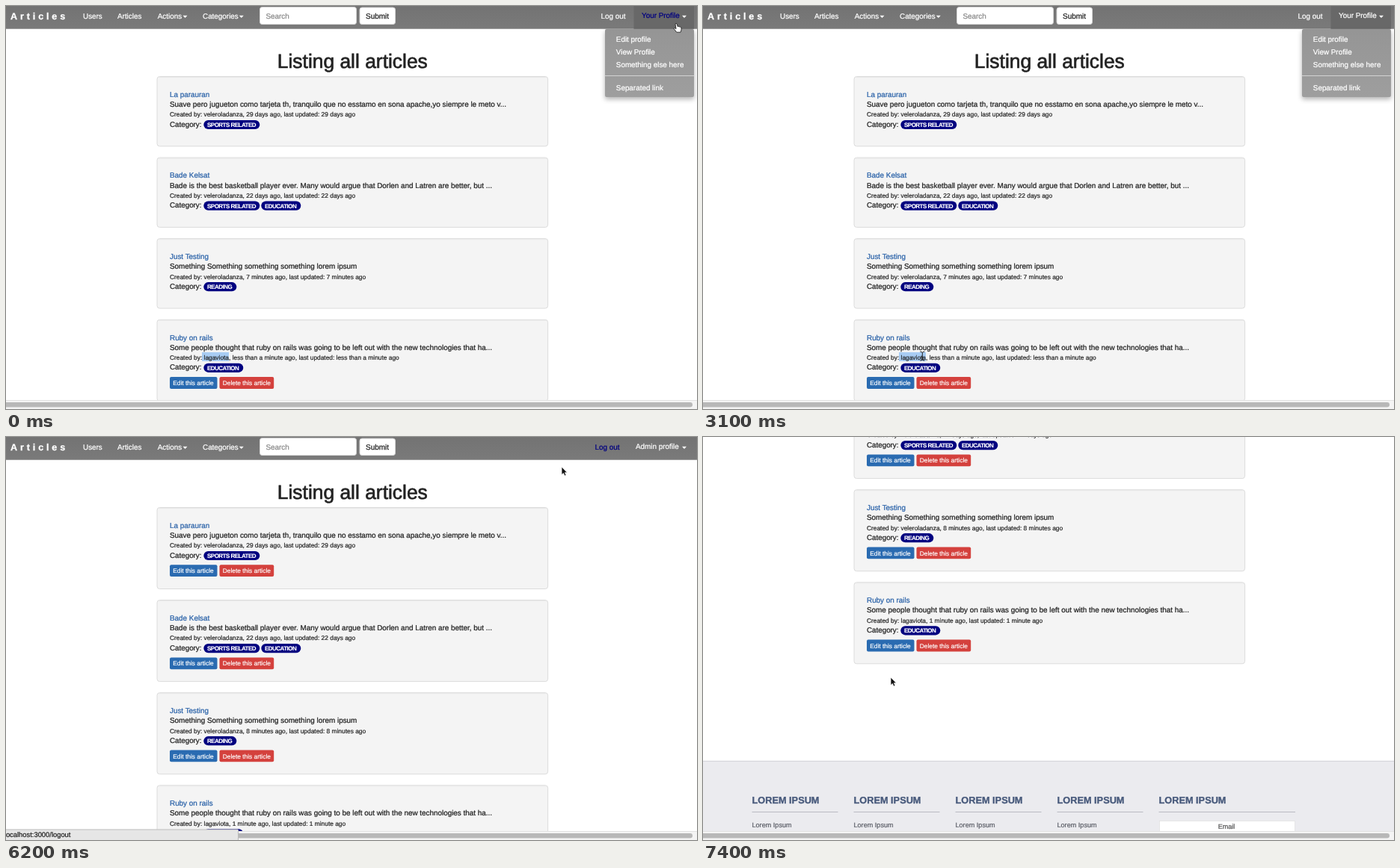
An HTML page that plays this animation: 924 px wide and 540 px high, repeating every 7500 ms.

```html
<!DOCTYPE html>
<html lang="en">
<head>
<meta charset="utf-8">
<title>Listing all articles</title>
<style>
html, body { margin: 0; width: 100%; height: 100%; overflow: hidden; background: #fff; }
svg { display: block; width: 924px; height: 540px; }
text { font-family: "Liberation Sans", Arial, sans-serif; text-rendering: geometricPrecision; white-space: pre; }
</style>
</head>
<body>
<svg id="stage" viewBox="0 0 924 540"></svg>
<script>
const LOOP = 7500, STEP = 100, SWITCH = 5000;
const NAVY = '#000080', INK = '#222';

// a thin outline in the fill colour gives the slightly heavy look of the page
const text = (x, y, size, fill, str, extra = '') =>
  `<text x="${x}" y="${y}" font-size="${size}" fill="${fill}" stroke="${fill}" stroke-width="${size * .025}" ${extra}>${str}</text>`;
const box = (x, y, w, h, fill, r = 0, extra = '') =>
  `<rect x="${x}" y="${y}" width="${w}" height="${h}" rx="${r}" fill="${fill}" ${extra}/>`;
const caret = x => `<path d="M${x} 12.8h6l-3 3.2z" fill="#fff"/>`;
const white = (x, y, str, extra) => text(x, y, 9.9, '#fff', str, extra);

const badgeWidth = { 'SPORTS RELATED': 75, EDUCATION: 53, READING: 44 };
const articles = [
  { title: 'La parauran', by: 'veleroladanza', tags: ['SPORTS RELATED'], age: ['29 days', '29 days'],
    body: 'Suave pero jugueton como tarjeta th, tranquilo que no esstamo en sona apache,yo siempre le meto v...' },
  { title: 'Bade Kelsat', by: 'veleroladanza', tags: ['SPORTS RELATED', 'EDUCATION'], age: ['22 days', '22 days'],
    body: 'Bade is the best basketball player ever. Many would argue that Dorlen and Latren are better, but ...' },
  { title: 'Just Testing', by: 'veleroladanza', tags: ['READING'], age: ['7 minutes', '8 minutes'],
    body: 'Something Something something something lorem ipsum' },
  { title: 'Ruby on rails', by: 'lagaviota', tags: ['EDUCATION'], age: ['less than a minute', '1 minute'],
    body: 'Some people thought that ruby on rails was going to be left out with the new technologies that ha...' }
];

function button(x, y, w, fill, label) {
  return box(x, y, w, 15.8, fill, 2) + text(x + 4.2, y + 11, 8.4, '#fff', label);
}

function card(a, i, admin) {
  const y = 94.5 + i * (admin ? 124.1 : 108.6);
  const own = admin || i === 3;
  const age = a.age[+admin];
  let s = box(202, y, 522.6, own ? 109 : 93.4, '#f4f4f4', 3.5, 'stroke="#dcdcdc"') +
    `<path d="M204 ${y + 1}h519" stroke="#e8e8e8"/>`;
  if (own && !admin) s += box(262, y + 43.6, 36, 12, '#a8ccf3');
  s += text(219, y + 27.3, 9.9, '#2a62a8', a.title) +
    text(219, y + 40.4, 9.88, INK, a.body) +
    text(219, y + 53.8, 8.37, INK, `Created by: ${a.by}, ${age} ago, last updated: ${age} ago`) +
    text(219, y + 67, 9.8, INK, 'Category:');
  let x = 264.3;
  for (const tag of a.tags) {
    s += box(x, y + 58.4, badgeWidth[tag], 12.2, NAVY, 6.1) +
      text(x + 4.7, y + 67.4, 8, '#fff', tag, 'font-weight="700" letter-spacing="-.52"');
    x += badgeWidth[tag] + 2;
  }
  if (own) {
    s += button(219, y + 76.8, 63.5, '#2a6bb1', 'Edit this article') +
      button(285.5, y + 76.8, 72.7, '#d4413d', 'Delete this article');
  }
  return s;
}

function navbar(admin) {
  return box(0, 0, 924, 30.7, 'url(#bar)') +
    text(6, 18, 12.5, '#fff', 'Articles', 'font-weight="700" letter-spacing="3.9"') +
    white(103, 16.5, 'Users') + white(149, 16.5, 'Articles') +
    white(202.7, 16.5, 'Actions') + caret(236.5) +
    white(263, 16.5, 'Categories') + caret(311.8) +
    box(339.5, 1.5, 129, 23, '#fff', 3, 'stroke="#d4d4d4"') + text(347.5, 16.7, 9.9, '#8a8a8a', 'Search') +
    box(473, 2, 47.5, 22.5, '#fff', 3, 'stroke="#d4d4d4"') + text(481, 17.2, 10, INK, 'Submit') +
    (admin ? '' : box(839.5, 0, 80.5, 30.7, '#686868')) +
    white(admin ? 787.5 : 795.5, 16.6, 'Log out', 'class="logout"') +
    white(admin ? 842 : 850, 16.4, admin ? 'Admin profile' : 'Your Profile', 'class="profile"') + caret(904);
}

function dropdown() {
  return '<g id="menu">' + box(801, 31, 119, 91, 'url(#drop)', 2, 'filter="url(#shadow)"') +
    white(815.8, 47.8, 'Edit profile') + white(815.8, 64.8, 'View Profile') +
    white(815.8, 81.8, 'Something else here') +
    box(801, 93, 119, 1, '#d2d2d2') + white(815.8, 112.8, 'Separated link') + '</g>';
}

function footer() {
  let s = box(0, 706, 924, 200, '#ebebef') + box(0, 705.8, 924, 1, '#d2d2d6');
  for (let i = 0; i < 5; i++) {
    const x = 65.5 + i * 136, last = i === 4;
    s += text(x, 763, 12.75, '#47597b', 'LOREM IPSUM', 'font-weight="700"') +
      box(x, 774, last ? 182.5 : 115, 1, '#b9bac2');
    s += last
      ? box(x + 1, 786.5, 181, 22, '#fff', 0, 'stroke="#ddd" stroke-width=".6"') +
        text(700, 796.8, 9.1, '#555', 'Email', 'text-anchor="middle"')
      : text(x, 794.5, 9.1, '#5c5f68', 'Lorem Ipsum');
  }
  return s;
}

const page = admin => `<g id="${admin ? 'admin' : 'user'}">` +
  text(463.3, 83, 26.4, INK, 'Listing all articles', 'text-anchor="middle"') +
  articles.map((a, i) => card(a, i, admin)).join('') +
  navbar(admin) + (admin ? footer() : dropdown()) + '</g>';

const pointers = {
  arrow: '<path d="M0 0V10.6L2.4 8.4 4.1 12 6 11.2 4.4 7.7H7.4Z" fill="#111" stroke="#fff" stroke-width=".7"/>',
  hand: '<path d="M-1 1Q0-.6 1.1 1L2.2 4.6 3.4 4.2 4.4 4.9 5.6 4.8 6.2 5.6 7 6 7 9 6 12.2H.8L-2.8 7.6Q-2.8 6.3-1.5 6.7L0 7.6Z" fill="#fff" stroke="#222" stroke-width=".9"/>',
  beam: '<path d="M-3-6Q0-6 0-4.5Q0-6 3-6M0-5V5M-3 6Q0 6 0 4.5Q0 6 3 6M-1.2 2h2.4" fill="none" stroke="#222"/>'
};

const stage = document.getElementById('stage');
stage.innerHTML = `<defs>
  <linearGradient id="bar" x2="0" y2="1"><stop stop-color="#737373"/><stop offset="1" stop-color="#7a7a7a"/></linearGradient>
  <linearGradient id="drop" x2="0" y2="1"><stop stop-color="#959595"/><stop offset="1" stop-color="#9e9e9e"/></linearGradient>
  <filter id="shadow" x="-10%" y="-10%" width="120%" height="125%">
    <feDropShadow dx="0" dy="3" stdDeviation="3" flood-opacity=".3"/></filter></defs>` +
  box(0, 0, 924, 540, '#fff') + page(false) + page(true) +
  box(0, 528, 924, 12, '#f4f4f4') + box(0, 528, 924, 1, '#e2e2e2') + box(-8, 531, 926, 6.6, '#b8b8b8', 3.3) +
  '<g id="status">' + box(-4, 526, 314.5, 18, '#e6e6e6', 1, 'stroke="#bcbcbc"') +
  text(-2.2, 536.2, 9.4, '#222', '', 'id="link"') + '</g>' +
  '<g id="pointer">' + Object.entries(pointers).map(([k, p]) => `<g id="${k}">${p}</g>`).join('') + '</g>';

// time, x, y, pointer shape used from that time on
const path = [
  [0, 896, 23, 'hand'], [300, 872, 42, 'hand'], [800, 852, 74, 'hand'], [1200, 862, 60, 'hand'],
  [1400, 760, 130, 'arrow'], [1600, 480, 350, 'arrow'], [1800, 312, 466, 'beam'], [2000, 305, 469, 'beam'],
  [2600, 270, 470, 'beam'], [3200, 298, 469, 'beam'], [3800, 306, 468, 'beam'], [4000, 540, 270, 'arrow'],
  [4100, 812, 17, 'hand'], [4200, 857, 47, 'hand'], [4600, 868, 14, 'hand'], [4900, 872, 14, ''],
  [5600, 890, 14, 'hand'], [5900, 806, 14, 'hand'], [6100, 780, 30, 'arrow'], [6200, 743, 40, 'arrow'],
  [6500, 480, 190, 'arrow'], [6800, 251, 322, 'arrow'], [LOOP, 251, 322, 'arrow']
];
const scrolls = [[0, 0], [6800, 0], [6900, 4], [7000, 20], [7100, 82], [7200, 164], [7300, 232], [7400, 272], [LOOP, 290]];

function sample(keys, t) {
  const i = keys.findIndex(k => k[0] > t), a = keys[i - 1], b = keys[i];
  const u = (t - a[0]) / (b[0] - a[0]);
  return a.map((v, j) => typeof v === 'number' ? v + (b[j] - v) * u : v);
}

const $ = id => document.getElementById(id);
const show = (id, on) => $(id).setAttribute('display', on ? 'inline' : 'none');
const tint = (name, on) => stage.querySelectorAll('.' + name).forEach(e => {
  for (const paint of ['fill', 'stroke']) e.setAttribute(paint, on ? NAVY : '#fff');
});
const within = (t, a, b) => t >= a && t < b;

function draw(now) {
  const t = Math.floor(now % LOOP / STEP) * STEP;
  const [, x, y, kind] = sample(path, t);
  show('user', t < SWITCH);
  show('admin', t >= SWITCH);
  show('menu', t < 4900);
  $('admin').setAttribute('transform', `translate(0 ${-sample(scrolls, t)[1]})`);
  $('pointer').setAttribute('transform', `translate(${x} ${y})`);
  for (const k in pointers) show(k, k === kind);

  tint('profile', t < 300 || within(t, 4500, 4900) || within(t, 5600, 5800));
  tint('logout', within(t, 4100, 4300) || within(t, 5800, 6300));
  const leaving = within(t, 5900, 6400);
  show('status', leaving || within(t, 300, 1400));
  $('link').textContent = 'localhost:3000/' + (leaving ? 'logout' : 'articles#');
  requestAnimationFrame(draw);
}
draw(performance.now());
</script>
</body>
</html>
```
